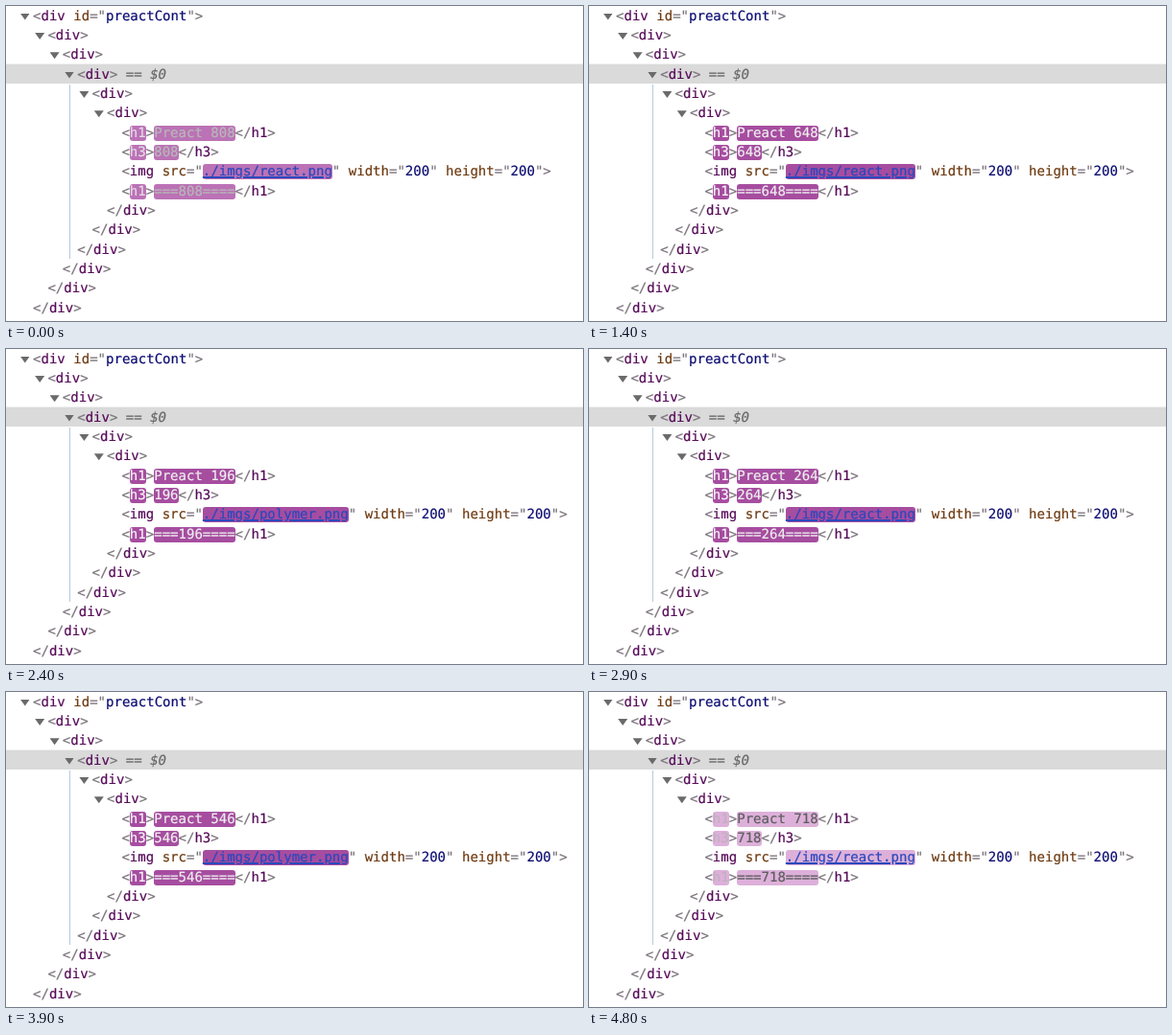
These frames come from a looping animation (601x329 px, 4.9 s). An HTML page:

```html
<!DOCTYPE html>
<html lang="en">
<head>
<meta charset="utf-8">
<title>Element tree</title>
<style>
html, body { margin: 0; width: 100%; height: 100%; overflow: hidden; background: #fff; }
#tree {
  position: relative; width: 601px; height: 329px; overflow: hidden;
  font: 14.03px "DejaVu Sans Mono", monospace; text-rendering: geometricPrecision;
  -webkit-text-stroke: 0.2px;
  --bg: #a0429a; --tag: #fff; --text: #fff;
}
.row, .bar, .guide, .arrow { position: absolute; }
.row { white-space: pre; height: 20.33px; line-height: 20.33px; color: #7c747c; }
.bar { left: 0; width: 601px; top: 60px; height: 20px; background: #dadada; border-top: 1px solid #f0f0f0; }
.guide { left: 66px; width: 1px; top: 82px; height: 182px; background: #b5c9dc; }
.arrow { width: 10px; height: 7px; background: #6a6a6a; clip-path: polygon(0 0, 100% 0, 50% 100%); }
.name { color: #560a58; }
.attr { color: #6e3a10; }
.val { color: #0c0c72; }
.hint { color: #686868; font-style: italic; }
.hot { background: var(--bg); border-radius: 3px; }
.hot.tag { color: var(--tag); }
.hot.text { color: var(--text); }
.hot.link { color: #2a48bc; text-decoration: underline 1.5px; }
</style>
</head>
<body>
<div id="tree"></div>
<script>
const PITCH = 20.33, INDENT = 15.4, LEFT = 28, TOP = 0.6;
const STEP = 100, STEPS = 49, PER_UPDATE = 5, FADE = 1120;
const counts = [808, 29, 431, 648, 375, 196, 264, 917, 546, 718];
const images = ["react.png", "preact.jpg", "polymer.png"];
const tree = document.getElementById("tree");

const span = (cls, text = "", id = "") =>
  `<span class="${cls}"${id && ` id="${id}"`}>${text}</span>`;
const attr = (name, value) => ` ${span("attr", name)}="${value}"`;
const size = name => attr(name, span("val", "200"));
const open = (name, rest = "") => `&lt;${span("name", name)}${rest}&gt;`;
const close = name => `&lt;/${span("name", name)}&gt;`;
const heading = (name, id) =>
  `&lt;${span("hot tag", name)}&gt;${span("hot text", "", id)}${close(name)}`;

// [depth, markup, expandable]
const rows = [[0, open("div", attr("id", span("val", "preactCont"))), true]];
for (let d = 1; d < 6; d++) {
  rows.push([d, open("div") + (d === 3 ? span("hint", " == $0") : ""), true]);
}
rows.push(
  [6, heading("h1", "title")],
  [6, heading("h3", "count")],
  [6, open("img", attr("src", span("hot link", "", "src")) + size("width") + size("height"))],
  [6, heading("h1", "footer")]
);
for (let d = 5; d >= 0; d--) rows.push([d, close("div")]);

tree.innerHTML = '<div class="bar"></div><div class="guide"></div>' +
  rows.map(([depth, html, arrow], i) => {
    const x = LEFT + depth * INDENT, y = TOP + i * PITCH;
    const mark = arrow ? `<div class="arrow" style="left:${x - 13.2}px;top:${y + 7}px"></div>` : "";
    return `${mark}<div class="row" style="left:${x}px;top:${y}px">${html}</div>`;
  }).join("");

const [title, count, src, footer] =
  ["title", "count", "src", "footer"].map(id => document.getElementById(id));

// cubic-bezier(0, 0, 0.2, 1)
function ease(x) {
  let lo = 0, hi = 1;
  for (let i = 0; i < 24; i++) {
    const m = (lo + hi) / 2;
    if (0.6 * m * m + 0.4 * m ** 3 < x) lo = m; else hi = m;
  }
  return 3 * lo * lo - 2 * lo ** 3;
}

const mix = (a, b, k) => `rgb(${a.map((v, i) => Math.round(v + (b[i] - v) * k))})`;
const white = [255, 255, 255];
let last = -1;

function draw() {
  const step = Math.floor(performance.now() / STEP) % STEPS;
  if (step !== last) {
    last = step;
    const update = Math.floor((step + 1) / PER_UPDATE);
    const age = (step + 1) % PER_UPDATE * STEP + 20;
    const k = ease(age / FADE), n = counts[update];
    title.textContent = `Preact ${n}`;
    count.textContent = n;
    src.textContent = `./imgs/${images[update % images.length]}`;
    footer.textContent = `===${n}====`;
    tree.style.setProperty("--bg", mix([160, 66, 154], [243, 217, 242], k));
    tree.style.setProperty("--tag", mix(white, [168, 148, 166], k));
    tree.style.setProperty("--text", mix(white, [34, 34, 34], k));
  }
  requestAnimationFrame(draw);
}
draw();
</script>
</body>
</html>
```
